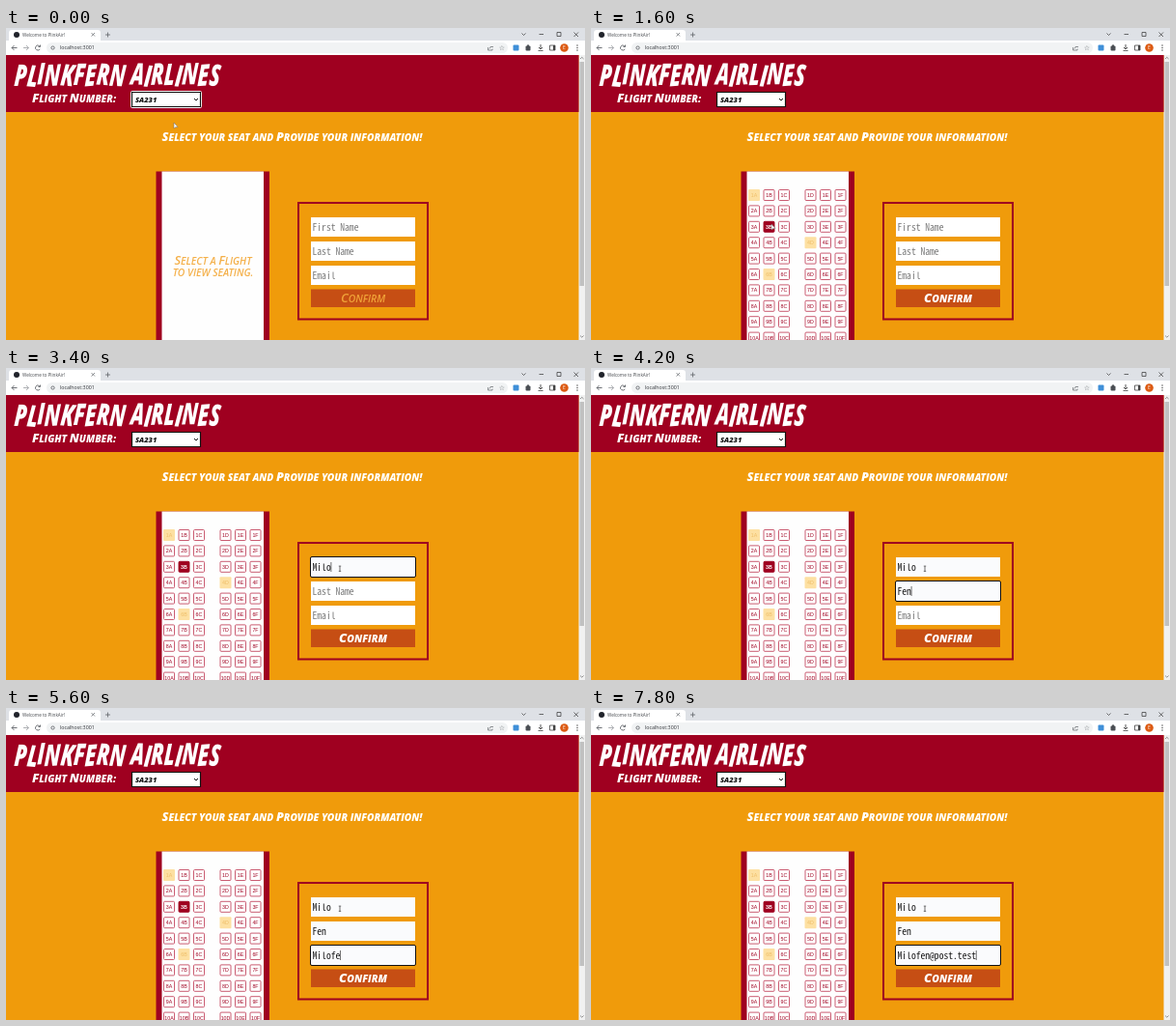
Animation, 600 px wide and 323 px high, one loop 8000 ms. Source, as an HTML page with a canvas:

```html
<!DOCTYPE html>
<html lang="en">
<head>
<meta charset="utf-8">
<title>Seat booking</title>
<style>
html, body { margin: 0; width: 100%; height: 100%; overflow: hidden; background: #f09b0b; }
canvas { display: block; width: 600px; height: 323px; }
</style>
</head>
<body>
<canvas id="stage"></canvas>
<script>
const canvas = document.getElementById('stage');
const ctx = canvas.getContext('2d');
const dpr = Math.max(1, window.devicePixelRatio || 1);
canvas.width = 600 * dpr;
canvas.height = 323 * dpr;

const LOOP = 8000, STEP = 200;
const RED = '#9f0020', ORANGE = '#f09b0b', RUST = '#c64e14', GREY = '#5f6368';
const MARKER = '"Open Sans", "Noto Sans", sans-serif';
const MONO = '"Noto Sans Mono CJK JP", "Noto Sans Mono", monospace';
const UI = '"Open Sans", sans-serif';
const SEAT = '"Liberation Sans", sans-serif';

const SEATS_AT = 200, PICK_AT = 1400, FOCUS_AT = 2400;
const TAKEN = ['1A', '4D', '6B'];
const SEAT_X = { A: 169, B: 184.5, C: 200, D: 227.5, E: 243, F: 258.5 };

// Each field: text, and [time, letters shown] steps
const FIELDS = [
  { hint: 'First Name', text: 'Milo', focus: FOCUS_AT, blur: 3600,
    keys: [[2800, 1], [3000, 2], [3200, 3], [3400, 4]] },
  { hint: 'Last Name', text: 'Fen', focus: 3600, blur: 4600,
    keys: [[3800, 1], [4000, 2], [4200, 3]] },
  { hint: 'Email', text: 'Milofen@post.test', focus: 4600, blur: LOOP,
    keys: [[4800, 1], [5000, 2], [5200, 3], [5400, 4], [5600, 6], [5800, 7],
           [6800, 8], [7000, 10], [7200, 11], [7400, 13], [7600, 15], [7800, 17]] }
];

// time, x, y
const POINTER = [[0, 174, 100], [200, 174, 102], [1000, 185, 200], [1400, 185, 204],
                 [1600, 187, 205], [2400, 346, 207]];

function rect(x, y, w, h, fill, r = 0) {
  ctx.fillStyle = fill;
  ctx.beginPath();
  ctx.roundRect(x, y, w, h, r);
  ctx.fill();
}

function frame(x, y, w, h, color, width = 1, r = 0) {
  ctx.strokeStyle = color;
  ctx.lineWidth = width;
  ctx.beginPath();
  ctx.roundRect(x, y, w, h, r);
  ctx.stroke();
}

function line(color, width, ...pts) {
  ctx.strokeStyle = color;
  ctx.lineWidth = width;
  ctx.beginPath();
  for (let i = 0; i < pts.length; i += 2) ctx.lineTo(pts[i], pts[i + 1]);
  ctx.stroke();
}

function dot(x, y, r, fill) {
  ctx.fillStyle = fill;
  ctx.beginPath();
  ctx.arc(x, y, r, 0, 7);
  ctx.fill();
}

function text(str, x, y, font, fill, align = 'left') {
  ctx.font = font;
  ctx.fillStyle = fill;
  ctx.textAlign = align;
  ctx.fillText(str, x, y);
}

// Small capitals: lower-case runs become slightly smaller capitals
function marker(str, x, y, size, fill, align = 'left', weight = 800) {
  const runs = str.match(/[A-Z0-9]+|[^A-Z0-9]+/g).map(run => {
    const small = run !== run.toUpperCase();
    const font = `italic ${weight} ${small ? size * .8 : size}px ${MARKER}`;
    ctx.font = font;
    const str = run.toUpperCase();
    return { str, font, width: ctx.measureText(str).width };
  });
  if (align === 'center') x -= runs.reduce((sum, r) => sum + r.width, 0) / 2;
  for (const r of runs) {
    text(r.str, x, y, r.font, fill);
    x += r.width;
  }
}

function drawBrowser() {
  rect(0, 0, 600, 14, '#dee1e6');
  rect(3, 2, 95, 14, '#fff', 3);
  dot(11, 7, 3, '#20232a');
  text('Welcome to PlinkAir!', 17, 8.7, `4.6px ${UI}`, '#45494d');
  line(GREY, .7, 88.5, 5, 92, 8.5);
  line(GREY, .7, 92, 5, 88.5, 8.5);
  line(GREY, .8, 103, 7, 108, 7);
  line(GREY, .8, 105.5, 4.5, 105.5, 9.5);
  line('#333', .7, 534.5, 5.5, 536.5, 7.5, 538.5, 5.5);
  line('#333', .7, 552.5, 6.5, 557, 6.5);
  frame(571, 4.5, 4, 4, '#333', .7);
  line('#333', .7, 588.5, 4.5, 593, 9);
  line('#333', .7, 593, 4.5, 588.5, 9);

  rect(0, 13, 600, 15, '#fff');
  rect(42, 15, 478, 11, '#f1f3f4', 5.5);
  line(GREY, .9, 11.5, 20.5, 6, 20.5);
  line(GREY, .9, 8.5, 18, 6, 20.5, 8.5, 23);
  line('#a5a8ac', .9, 18, 20.5, 23.5, 20.5);
  line('#a5a8ac', .9, 21, 18, 23.5, 20.5, 21, 23);
  ctx.strokeStyle = GREY;
  ctx.lineWidth = .9;
  ctx.beginPath();
  ctx.arc(33, 20.5, 2.5, .5, 5.6);
  ctx.stroke();
  line(GREY, .9, 35.5, 17.5, 35.5, 19.5, 33.5, 19.5);
  dot(48.5, 20.5, 2, GREY);
  dot(48.5, 20.5, 1.2, '#f1f3f4');
  text('localhost:3001', 56, 22.3, `5.3px ${UI}`, '#303337');

  line(GREY, .7, 499.5, 20, 499.5, 23, 504, 23, 504, 21.5);
  line(GREY, .7, 501, 21.5, 502, 19.5, 505, 19.5);
  text('☆', 514, 23, '7px "DejaVu Sans", sans-serif', GREY, 'center');
  rect(525.5, 17.5, 6, 6, '#3f8fd8', 1);
  rect(538.5, 18.5, 5, 5, '#4b4f54', 1);
  dot(541, 18.3, 1.1, '#4b4f54');
  line('#444', .9, 554, 17, 554, 22);
  line('#444', .9, 552, 20, 554, 22, 556, 20);
  line('#444', .8, 551.5, 23.5, 556.5, 23.5);
  frame(563.5, 18, 5.5, 5, '#444', .8);
  rect(567, 18, 2, 5, '#444');
  dot(578.5, 20.5, 4.3, '#dc5a12');
  text('E', 578.5, 22.3, `5px ${UI}`, '#fff', 'center');
  for (const y of [18, 20.5, 23]) dot(592, y, .7, '#444');

  rect(593.5, 28, 6.5, 295, '#f1f1f1');
  rect(594.5, 35, 4.5, 232, '#c1c1c1');
  line('#777', .8, 595, 32, 596.8, 30.3, 598.6, 32);
  line('#777', .8, 595, 318.5, 596.8, 320.2, 598.6, 318.5);
}

// Narrow brush lettering with a slight wobble from letter to letter
function drawLogotype() {
  ctx.save();
  ctx.translate(8, 59.5);
  ctx.transform(.67, 0, -.08, 1, 0, 0);
  let x = 0;
  [...'PLINKFERN AIRLINES'].forEach((ch, i) => {
    ctx.save();
    ctx.translate(x, Math.sin(i * 2.4));
    ctx.rotate(Math.sin(i * 1.9) * .06);
    text(ch, 0, 0, `italic 800 31px ${MARKER}`, '#fff');
    x += ctx.measureText(ch).width;
    ctx.restore();
  });
  ctx.restore();
}

function drawHeader(t) {
  rect(0, 28, 593.5, 59, RED);
  drawLogotype();
  marker('Flight Number:', 27, 77, 12.7, '#fff');

  if (t < PICK_AT) frame(129.5, 65.5, 73, 17, '#fff', 1, 1);
  rect(130.5, 66.5, 71, 15, '#fff');
  frame(130.5, 66.5, 71, 15, '#111', 1.2);
  marker('SA231', 134, 76.7, 7.5, '#111');
  line('#111', 1, 195, 73, 197, 75, 199, 73);
}

function drawSeat(name, x, y, picked) {
  const taken = TAKEN.includes(name);
  const label = taken ? '#eebd68' : picked ? '#fff' : RED;
  if (taken) rect(x - 6, y - 6, 12, 12, '#fde0a2', 1);
  else {
    rect(x - 5.5, y - 5.5, 11, 11, picked ? RED : '#fff', 1);
    frame(x - 5.5, y - 5.5, 11, 11, picked ? RED : '#c44a62', .9, 1);
  }
  text(name, x, y + 1.9, `${picked ? 'bold ' : ''}5.3px ${SEAT}`, label, 'center');
}

function drawPlane(t) {
  rect(155.5, 148.5, 117.5, 175, RED);
  rect(161.5, 148.5, 105.5, 175, '#fefefe');
  if (t < SEATS_AT) {
    marker('Select a Flight', 214.5, 245, 13, '#f4b04a', 'center', 600);
    marker('to view seating.', 214.5, 257, 13, '#f4b04a', 'center', 600);
    return;
  }
  for (let row = 1; row <= 10; row++) {
    for (const col in SEAT_X) {
      const name = row + col;
      drawSeat(name, SEAT_X[col], 173 + (row - 1) * 16.4, name === '3B' && t >= PICK_AT);
    }
  }
}

function drawField(f, i, t) {
  const y = 196 + i * 25;
  const focused = t >= f.focus && t < f.blur;
  const count = f.keys.reduce((n, [at, len]) => t >= at ? len : n, 0);
  const typed = f.text.slice(0, count);
  rect(316, y, 108, 20, count ? '#fafbfd' : '#fff');
  if (focused) frame(315.5, y - .5, 109, 21, '#111', 1, 1.5);
  text(typed || f.hint, 317.5, y + 13.6, `9.6px ${MONO}`, count ? '#111' : '#757575');
  const resting = t >= 6200 && t < 7000;
  if (focused && count && !resting) {
    const x = 317.7 + ctx.measureText(typed).width;
    line('#111', .6, x, y + 5, x, y + 15);
  }
}

function drawForm(t) {
  frame(303, 181, 134, 120.5, RED, 2);
  FIELDS.forEach((f, i) => drawField(f, i, t));
  rect(316, 270.5, 108, 18.5, RUST);
  const ready = t >= PICK_AT;
  marker('Confirm', 370, 284.3, 13, ready ? '#fff' : '#f0a338', 'center', ready ? 800 : 600);
}

function pointerAt(t) {
  const i = POINTER.findIndex(p => p[0] > t);
  if (i < 0) return POINTER[POINTER.length - 1].slice(1);
  const [t0, x0, y0] = POINTER[i - 1], [t1, x1, y1] = POINTER[i];
  const k = (t - t0) / (t1 - t0), e = k * k * (3 - 2 * k);
  return [x0 + (x1 - x0) * e, y0 + (y1 - y0) * e];
}

function drawPointer(t) {
  const [x, y] = pointerAt(t);
  if (x > 316) {
    line('#333', .7, x, y - 1.7, x, y + 3.2);
    line('#333', .7, x - 1.2, y - 1.9, x + 1.2, y - 1.9);
    line('#333', .7, x - 1.2, y + 3.4, x + 1.2, y + 3.4);
    return;
  }
  ctx.beginPath();
  ctx.moveTo(x, y - 2);
  ctx.lineTo(x, y + 4);
  ctx.lineTo(x + 1.5, y + 2.8);
  ctx.lineTo(x + 4, y + 2.5);
  ctx.closePath();
  ctx.fillStyle = '#fff';
  ctx.fill();
  ctx.strokeStyle = '#777';
  ctx.lineWidth = .6;
  ctx.stroke();
}

function draw(t) {
  ctx.setTransform(dpr, 0, 0, dpr, 0, 0);
  rect(0, 0, 600, 323, ORANGE);
  drawBrowser();
  drawHeader(t);
  marker('Select your seat and Provide your information!', 296.5, 117, 12.7, '#fff', 'center');
  drawPlane(t);
  drawForm(t);
  drawPointer(t);
}

const start = performance.now();
function tick() {
  const t = (performance.now() - start) % LOOP;
  draw(Math.floor(t / STEP) * STEP);
  requestAnimationFrame(tick);
}
tick();
</script>
</body>
</html>
```
